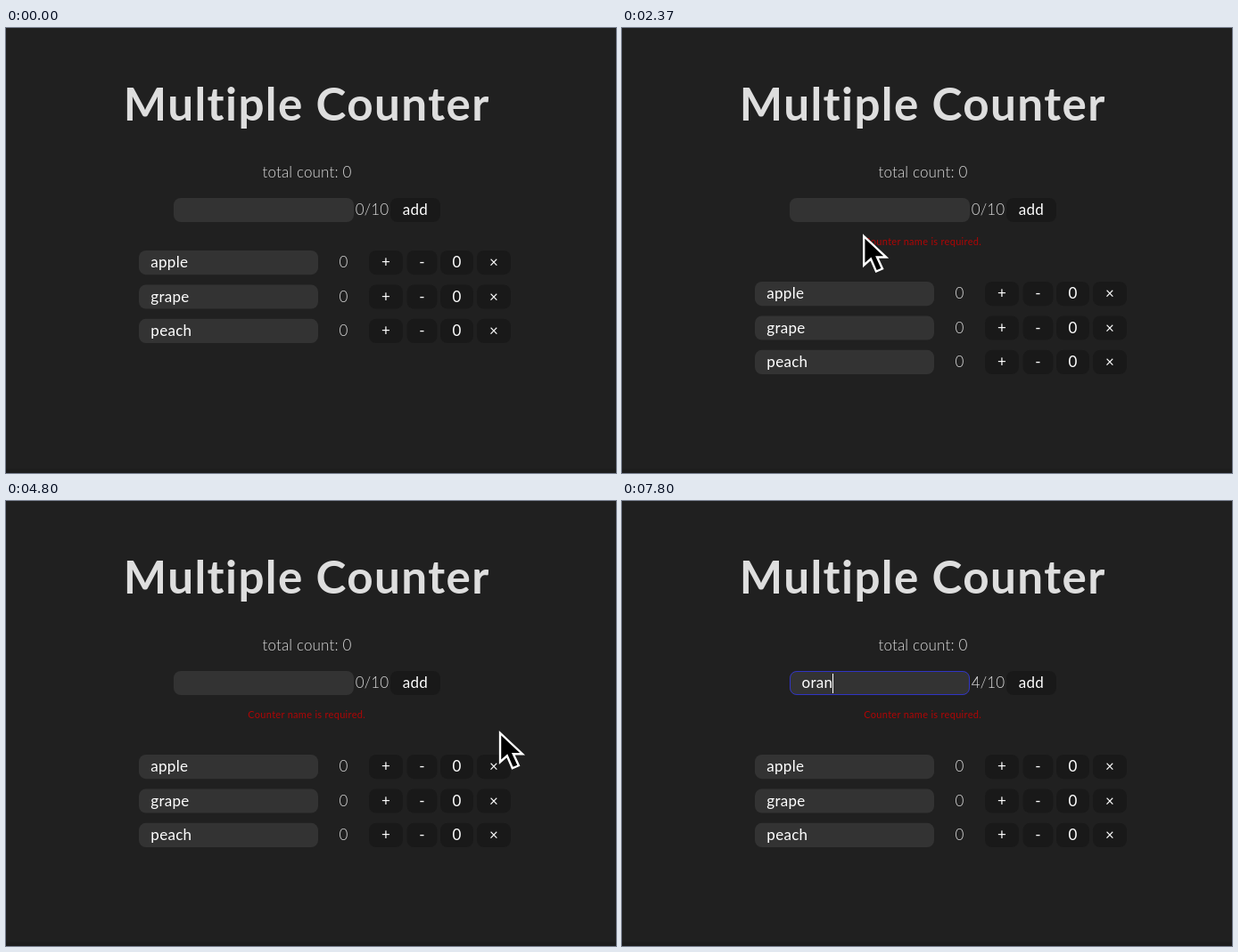
An HTML page that plays this animation: 684x500 px, repeating every 8000 ms.

```html
<!DOCTYPE html>
<html lang="en">
<head>
<meta charset="utf-8">
<title>Multiple Counter</title>
<style>
html, body { margin: 0; width: 100%; height: 100%; overflow: hidden; background: #202020; }
svg { display: block; width: 684px; height: 500px; }
text { font: 400 17px Lato, "Open Sans", sans-serif; letter-spacing: .3px; fill: #fff; white-space: pre; }
.mid { text-anchor: middle; }
.light { font-weight: 300; fill: #dedede; letter-spacing: .15px; }
.title { font-size: 51.2px; font-weight: 700; fill: #dedede; letter-spacing: 1.4px; }
.error { font-size: 11px; fill: #b00505; }
.field { fill: #333; }
.button { fill: #191919; }
.ring { fill: none; stroke: #3034c4; }
</style>
</head>
<body>
<svg viewBox="0 0 684 500">
  <rect y="495.5" width="684" height="4.5" fill="#1c1c1c"/>
  <text class="title mid" x="337.3" y="104">Multiple Counter</text>
  <text class="light mid" x="337.5" y="168">total count: 0</text>

  <rect class="field" x="188" y="191" width="202" height="27" rx="8"/>
  <rect class="ring" id="inputRing" x="188.5" y="191.5" width="201" height="26" rx="7.5"/>
  <text id="typed" x="201.5" y="210"></text>
  <rect id="caret" y="194" width="1" height="22" fill="#fff"/>
  <text class="light mid" id="length" x="410.5" y="210">0/10</text>
  <rect class="button" x="431" y="191" width="56" height="27" rx="8"/>
  <rect class="ring" id="addRing" x="431.5" y="191.5" width="55" height="26" rx="7.5"/>
  <text class="mid" x="459" y="210">add</text>

  <g id="error">
    <rect id="selection" x="272" y="229" height="24" fill="#2e4a6d"/>
    <text class="error mid" x="337.2" y="244">Counter name is required.</text>
  </g>
  <g id="rows"></g>

  <g id="cursor">
    <path id="arrow" d="M1.2 3V35.5L9 28.5 15 42.5 22 39.5 16 26.5H26.2Z" stroke="#fff" stroke-width="2.4"/>
    <path id="hand" d="M-3.5 2Q-3.5-1.5-.5-1.5T4 3L6.5 12.5Q9 9.5 12.5 12 15.5 10.5 18 13 22.5 12 24 16.5L26 23Q26.5 26 23.5 31L22 38.5H9L7.5 34Q2 30-2 25L-8 20.5Q-10 17-6 16.3-2 16.5 1.5 20ZM8.5 20 10 29M13.5 19.5 14.5 29M18.5 19 19.2 28.5" fill="#fff" stroke="#000" stroke-width="1.6" stroke-linejoin="round"/>
    <g id="beam" fill="none" stroke-linecap="square">
      <path id="beamShape" d="M-7-19Q-1-19 0-14 1-19 7-19M0-14V14M-7 19Q-1 19 0 14 1 19 7 19M-3 6H3" stroke="#fff" stroke-width="6"/>
      <use href="#beamInner"/>
      <path id="beamInner" d="M-7-19Q-1-19 0-14 1-19 7-19M0-14V14M-7 19Q-1 19 0 14 1 19 7 19M-3 6H3" stroke="#000" stroke-width="2.4"/>
    </g>
  </g>
</svg>
<script>
const LOOP = 8000;
const ERROR_AT = 1170, DRAG_AT = 3170, DESELECT_AT = 4770, FOCUS_AT = 5600, TYPE_AT = 7170;
const $ = id => document.getElementById(id);
const show = (id, on) => $(id).setAttribute('visibility', on ? 'visible' : 'hidden');
const clamp = (v, lo, hi) => Math.min(hi, Math.max(lo, v));
const easeOut = p => 1 - (1 - p) ** 2;
const easeBoth = p => (1 - Math.cos(Math.PI * p)) / 2;

// Pointer path: start, end, target x, target y, easing
const moves = [
  [0, 1, 559, 399, easeOut],
  [370, 890, 450, 204, easeOut],
  [1560, 2230, 272, 233, easeBoth],
  [2340, 2370, 270, 231, easeOut],
  [2790, 2970, 270, 235, easeBoth],
  [DRAG_AT, 3500, 437, 238, easeBoth],
  [3500, 3670, 417, 237, easeBoth],
  [3910, 4230, 554, 258, easeBoth],
  [4770, 5400, 362, 215, easeBoth],
  [5400, 5570, 352, 209, easeOut],
  [5800, 6240, 549, 231, easeBoth],
];
const keys = [[TYPE_AT, 'o'], [7500, 'r'], [7600, 'a'], [7800, 'n']];

function pointer(t) {
  let x = 559, y = 399;
  for (const [start, end, tx, ty, ease] of moves) {
    if (t < start) break;
    const p = ease(clamp((t - start) / (end - start), 0, 1));
    x += (tx - x) * p;
    y += (ty - y) * p;
  }
  return { x, y };
}

const inside = ({ x, y }, left, top, right, bottom) =>
  x >= left && x <= right && y >= top && y <= bottom;
const overAdd = p => inside(p, 431, 191, 487, 218);

function cursorKind(t, p) {
  if (overAdd(p)) return 'hand';
  if (t >= DRAG_AT && t < DESELECT_AT) return 'arrow';
  const onText = inside(p, 188, 191, 390, 218) || inside(p, 394, 194, 427, 216) ||
    (t >= ERROR_AT && inside(p, 272, 229, 403, 253));
  return onText ? 'beam' : 'arrow';
}

function firstTime(from, test) {
  let t = from;
  while (t < LOOP && !test(pointer(t))) t += 10;
  return t;
}
const hoverIn = firstTime(370, overAdd);
const hoverOut = firstTime(ERROR_AT, p => !overAdd(p));
const ramp = (t, start) => clamp((t - start) / 250, 0, 1);

function buildRows() {
  const buttons = [['+', 407, 38], ['-', 449.5, 34], ['0', 487, 37], ['×', 528, 38]];
  $('rows').innerHTML = ['apple', 'grape', 'peach'].map((name, i) => {
    const top = 250 + i * 38.4, base = top + 19.3;
    return `<rect class="field" x="149" y="${top}" width="201" height="27.2" rx="8"/>
      <text x="162.3" y="${base}">${name}</text>
      <text class="light mid" x="378.5" y="${base}">0</text>` +
      buttons.map(([label, x, w]) =>
        `<rect class="button" x="${x}" y="${top}" width="${w}" height="27.2" rx="8"/>
        <text class="mid" x="${x + w / 2}" y="${base}">${label}</text>`).join('');
  }).join('');
}

function render(t) {
  const p = pointer(t);
  const kind = cursorKind(t, p);
  const cursorOn = t >= 370 && t < TYPE_AT;
  $('cursor').setAttribute('transform', `translate(${p.x} ${p.y})`);
  for (const id of ['arrow', 'hand', 'beam']) show(id, cursorOn && id === kind);

  const failed = t >= ERROR_AT;
  show('error', failed);
  $('rows').setAttribute('transform', `translate(0 ${failed ? 35 : 0})`);
  const selecting = t >= DRAG_AT && t < DESELECT_AT;
  const reach = t > 3500 ? 403 : p.x;
  $('selection').setAttribute('width', selecting ? clamp(reach - 272, 0, 131) : 0);

  $('addRing').setAttribute('opacity', ramp(t, hoverIn) - ramp(t, hoverOut));
  $('inputRing').setAttribute('opacity', t >= FOCUS_AT ? 1 : 0);

  const word = keys.filter(([at]) => t >= at).map(([, key]) => key).join('');
  if ($('typed').textContent !== word) $('typed').textContent = word;
  $('length').textContent = `${word.length}/10`;
  $('caret').setAttribute('x', Math.round(202 + (word ? $('typed').getComputedTextLength() - .5 : 0)));
  show('caret', t >= FOCUS_AT && (t < 6270 || t >= 6770));
}

buildRows();
$('beam').querySelector('use').remove();
const begin = performance.now();
function tick() {
  render((performance.now() - begin) % LOOP);
  requestAnimationFrame(tick);
}
tick();
</script>
</body>
</html>
```
